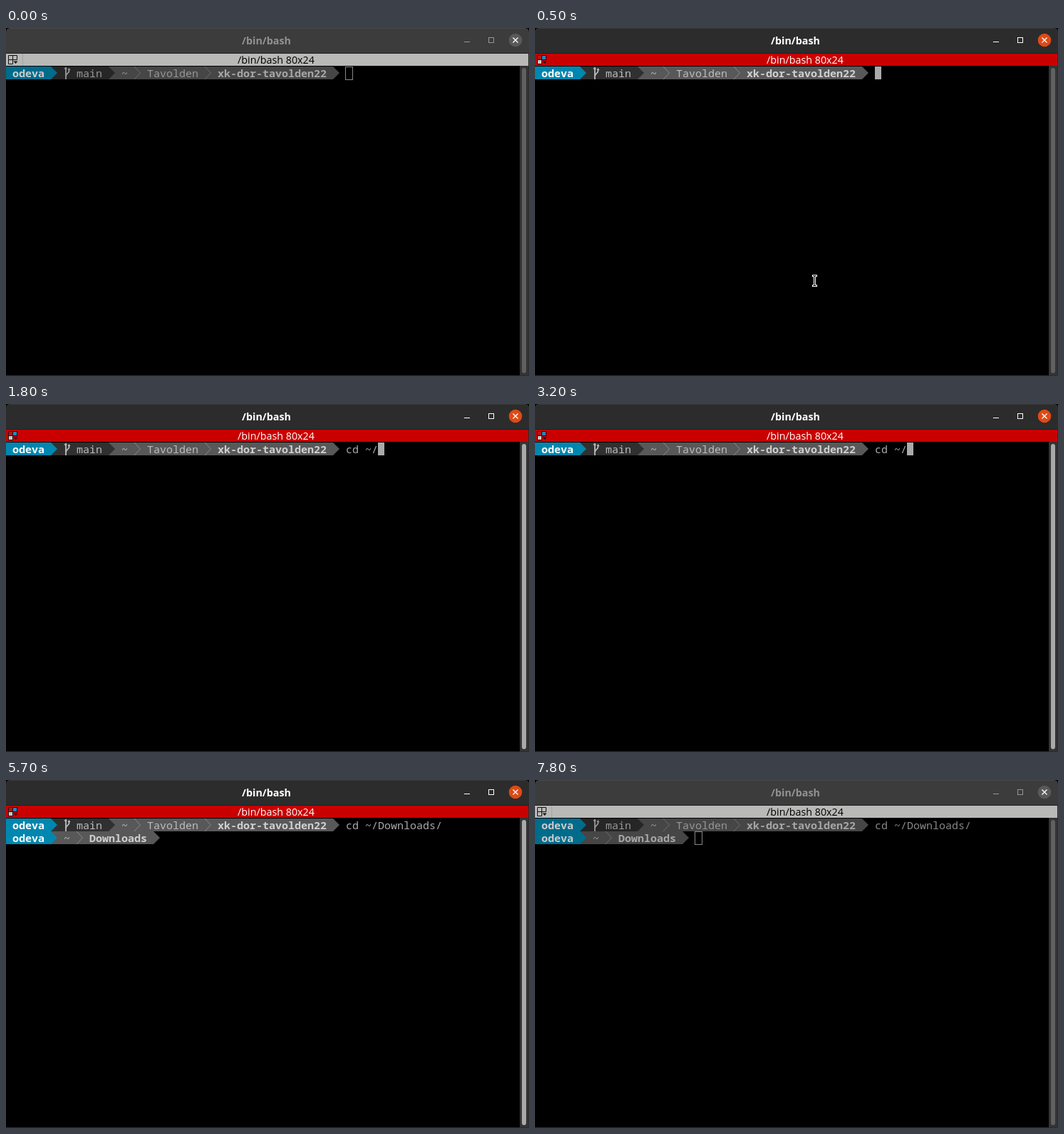
An HTML page that plays this animation: 734x488 px, repeating every 8000 ms.

```html
<!DOCTYPE html>
<html lang="en">
<head>
<meta charset="utf-8">
<title>Terminal</title>
<style>
  html, body { margin: 0; width: 100%; height: 100%; overflow: hidden; background: #000; }
  svg { display: block; width: 734px; height: 488px; }
  text { white-space: pre; }
  .ui { font: 14.3px "Open Sans", "Noto Sans", sans-serif; text-anchor: middle; }
  .bold { font-weight: 700; }
  .mono { font: 15px "Noto Sans Mono", "DejaVu Sans Mono", monospace; }
  .mono.bold { font-weight: 700; }
</style>
</head>
<body>
<svg viewBox="0 0 734 488" xmlns="http://www.w3.org/2000/svg">
  <rect width="734" height="488" fill="#000"/>

  <g id="headOff"></g>
  <g id="headOn"></g>

  <g id="barOff">
    <rect y="36" width="733" height="17" fill="#b9b9b7"/>
    <path d="M23.5 36V53" stroke="#a4a4a2"/>
    <path d="M3.5 38.5H15.5V44.5H3.5ZM3.5 44.5V50.5H9.5V38.5" fill="none" stroke="#111"/>
    <path d="M10.5 46.5H16.5L13.5 50Z" fill="#111"/>
    <text class="ui" x="379" y="50" fill="#000">/bin/bash 80x24</text>
  </g>
  <g id="barOn">
    <rect y="36" width="733" height="17" fill="#c80000"/>
    <rect x="3" y="38" width="13" height="13" fill="#1c1012"/>
    <rect x="4" y="39" width="5" height="5" fill="#b01818"/>
    <rect x="10" y="39" width="5" height="5" fill="#2a86b8"/>
    <rect x="4" y="45" width="5" height="5" fill="#c8c8c8"/>
    <path d="M10 45H16V51H10Z" fill="#c80000"/>
    <path d="M10.5 46.5H16.5L13.5 50Z" fill="#1c1012"/>
    <text class="ui" x="379" y="50" fill="#fff">/bin/bash 80x24</text>
  </g>

  <g id="term">
    <g id="row1"></g>
    <g id="row2"></g>
    <text id="typed" class="mono" x="477" y="69" fill="#aaa"></text>
    <rect id="solid" width="9" height="18" fill="#aaa"/>
    <rect id="hollow" width="10" height="18" fill="none" stroke="#aaa"/>
  </g>

  <rect x="721" y="53" width="12" height="434" fill="#333"/>
  <rect id="thumb" x="724" y="56" width="6" height="428" rx="3"/>
  <path d="M733.5 36V488M0 487.5H734" stroke="#2b2b2b"/>

  <g id="pointer" fill="none">
    <path d="M0 1.5H7M0 15.5H7M3.5 1V16" stroke="#fff" stroke-width="3"/>
    <path d="M1 1.5H6M1 15.5H6M3.5 1V16" stroke="#000"/>
  </g>
</svg>

<script>
const $ = id => document.getElementById(id);
const LOOP = 8000, CELL = 9, LINE = 18, TOP = 54;

// Each track lists [start in ms, value]; a value holds until the next start.
const tracks = {
  head: [[0, 0], [400, .5], [500, 1], [7800, 0]],
  focus: [[0, false], [400, true], [7800, false]],
  thumb: [[0, "#606060"], [600, "#a9a9a9"], [7800, "#606060"]],
  typed: [[0, ""], [1100, "c"], [1200, "cd "], [1700, "cd ~"], [1800, "cd ~/"],
          [2600, "cd ~"], [3200, "cd ~/"], [3600, "cd ~/D"], [3800, "cd ~/Do"],
          [3900, "cd ~/Dow"], [4700, "cd ~/Downloads/"]],
  entered: [[0, false], [5100, true]],
  caret: [[0, true], [4500, false], [4700, true], [5700, false], [6300, true],
          [6900, false], [7500, true]],
  pointer: [[0, null], [400, [389, 346]], [900, null], [6800, [392, 348]],
            [6900, [229, 474]], [7100, null]]
};

function at(track, t) {
  let value;
  for (const [start, v] of track) if (start <= t) value = v;
  return value;
}

function header(bg, edge, title, icon, button) {
  return `<path d="M0 36V6Q0 0 6 0H728Q734 0 734 6V36Z" fill="${bg}"/>
    <path d="M5 .5H729" stroke="${edge}"/>
    <path d="M0 35.5H734" stroke="#202020"/>
    <text class="ui bold" x="365.5" y="23" fill="${title}">/bin/bash</text>
    <path d="M643 19.5H651" stroke="${icon}"/>
    <rect x="677.5" y="13.5" width="7" height="7" fill="none" stroke="${icon}"/>
    <circle cx="715" cy="17" r="9.3" fill="${button}"/>
    <path d="M711.5 13.5L718.5 20.5M718.5 13.5L711.5 20.5" stroke="#fff" stroke-width="1.4"/>`;
}

const BLUE = "#0087af", DARK = "#303030", GREY = "#585858", SOFT = "#bcbcbc";

function prompt(row, parts) {
  const y = TOP + row * LINE, mid = y + LINE / 2, end = y + LINE;
  const draw = {
    fill: (col, cells, color) =>
      `<rect x="${col * CELL}" y="${y}" width="${cells * CELL}" height="${LINE}" fill="${color}"/>`,
    arrow: (col, color) =>
      `<path d="M${col * CELL} ${y}L${(col + 1) * CELL} ${mid}L${col * CELL} ${end}Z" fill="${color}"/>`,
    chevron: col =>
      `<path d="M${col * CELL} ${y}L${(col + 1) * CELL - .5} ${mid}L${col * CELL} ${end}" fill="none" stroke="#8a8a8a"/>`,
    text: (col, str, color, bold) =>
      `<text class="mono${bold ? " bold" : ""}" x="${col * CELL}" y="${y + 15}" fill="${color}">${str}</text>`,
    branch: col =>
      `<g transform="translate(${col * CELL} ${y})" fill="none" stroke="${SOFT}" stroke-width="1.8">
        <path d="M3 2V18M7.5 4V6.5C7.5 9.5 3 9.5 3 14"/>
        <path d="M1 3.5L3 1.5L4.5 3.5M6 5L7.5 3L9 5" stroke-width="1.2"/></g>`
  };
  return parts.map(([kind, ...args]) => draw[kind](...args)).join("");
}

$("headOff").innerHTML = header("#3c3c3c", "#484848", "#929292", "#969696", "#595959");
$("headOn").innerHTML = header("#2c2c2c", "#3a3a3a", "#fff", "#fff", "#de4a16");

$("row1").innerHTML = prompt(0, [
  ["fill", 0, 7, BLUE], ["fill", 7, 9, DARK], ["fill", 16, 35, GREY],
  ["arrow", 7, BLUE], ["arrow", 16, DARK], ["arrow", 51, GREY],
  ["text", 1, "odeva", "#fff", true],
  ["branch", 9], ["text", 11, "main", SOFT],
  ["text", 18, "~", SOFT], ["chevron", 20],
  ["text", 22, "Tavolden", SOFT], ["chevron", 31],
  ["text", 33, "xk-dor-tavolden22", "#d0d0d0", true]
]);
$("row2").innerHTML = prompt(1, [
  ["fill", 0, 7, BLUE], ["fill", 7, 16, GREY],
  ["arrow", 7, BLUE], ["arrow", 23, GREY],
  ["text", 1, "odeva", "#fff", true],
  ["text", 9, "~", SOFT], ["chevron", 11],
  ["text", 13, "Downloads", "#d0d0d0", true]
]);

const show = (id, on) => $(id).setAttribute("visibility", on ? "visible" : "hidden");

function place(id, x, y) {
  $(id).setAttribute("transform", `translate(${x} ${y})`);
}

function render(t) {
  const s = {};
  for (const name in tracks) s[name] = at(tracks[name], t);

  $("headOn").setAttribute("opacity", s.head);
  show("barOn", s.focus);
  show("barOff", !s.focus);
  $("term").setAttribute("opacity", s.focus ? 1 : .8);
  $("thumb").setAttribute("fill", s.thumb);

  if ($("typed").textContent !== s.typed) $("typed").textContent = s.typed;
  show("row2", s.entered);

  const x = (s.entered ? 25 : 53 + s.typed.length) * CELL;
  const y = TOP + (s.entered ? LINE : 0);
  place("solid", x, y);
  place("hollow", x - .5, y + .5);
  show("solid", s.focus && s.caret);
  show("hollow", !s.focus);

  show("pointer", s.pointer);
  if (s.pointer) place("pointer", ...s.pointer);
}

const begin = performance.now();
function tick() {
  render((performance.now() - begin) % LOOP);
  requestAnimationFrame(tick);
}
render(0);
requestAnimationFrame(tick);
</script>
</body>
</html>
```
